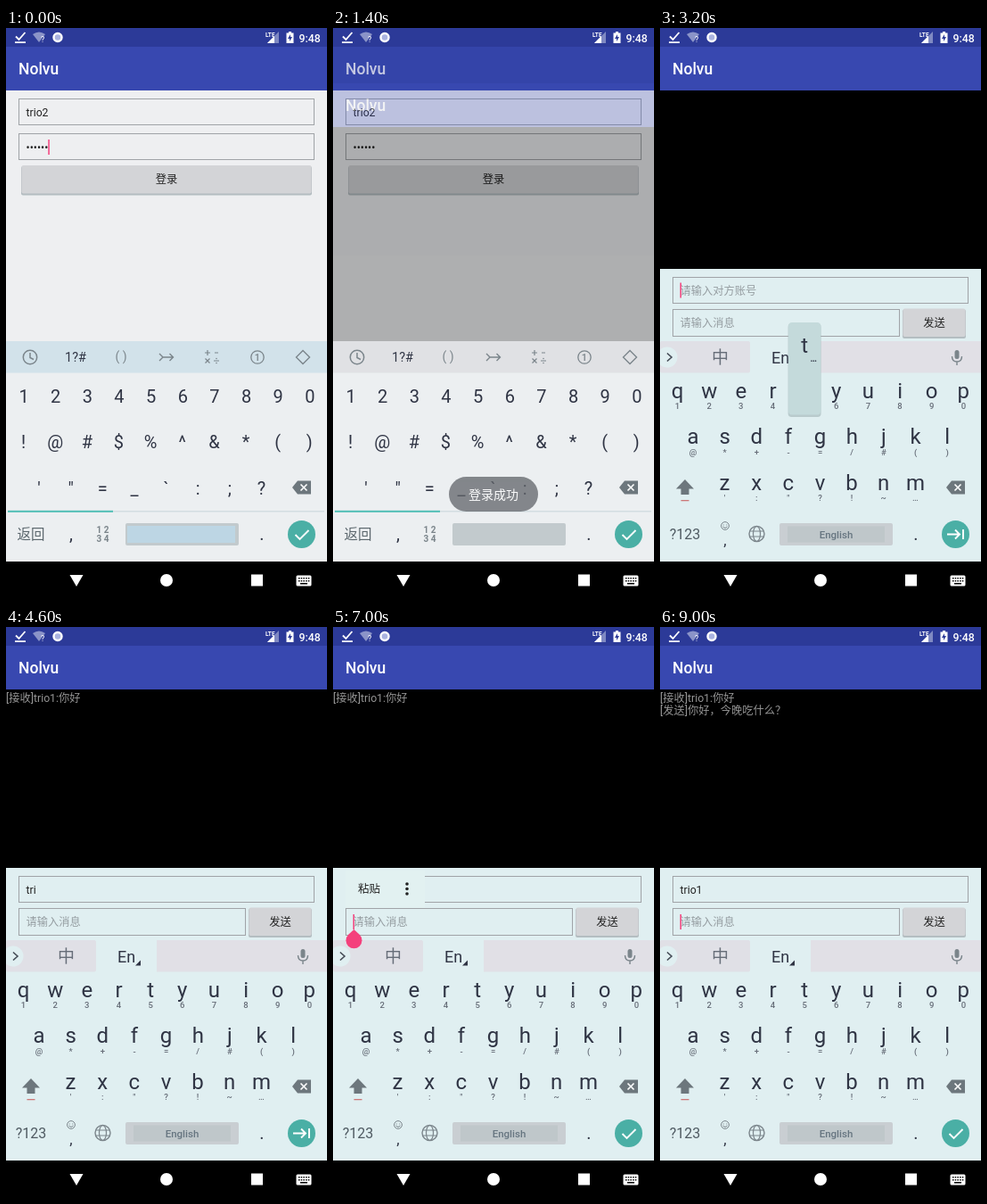
An HTML page that plays this animation: 360x640 px, repeating every 9200 ms.

```html
<!DOCTYPE html>
<html lang="zh">
<head>
<meta charset="utf-8">
<style>
  html, body { margin: 0; width: 100%; height: 100%; overflow: hidden; background: #000; }
  svg { display: block; width: 360px; height: 640px; }
  text { font-family: Roboto, "Noto Sans CJK SC", "Noto Sans CJK", sans-serif; white-space: pre; }
</style>
</head>
<body>
<svg id="stage" viewBox="0 0 360 640"></svg>
<script>
const LOOP = 9200, STEP = 200;
const APP = 'Nolvu', USER = 'trio2', PEER = 'trio1', MESSAGE = '你好，今晚吃什么？';
const INK = '#2f3444', GREY = '#7b858b', PINK = '#f4407c', TEAL = '#4aafa5', PALE = '#e0eff1';
const stage = document.getElementById('stage');
const pen = document.createElement('canvas').getContext('2d');
pen.font = '12.25px Roboto, "Noto Sans CJK SC", sans-serif';

const rect = (x, y, w, h, fill, extra = '') =>
  `<rect x="${x}" y="${y}" width="${w}" height="${h}" fill="${fill}" ${extra}/>`;
const disc = (x, y, r, fill, extra = '') => `<circle cx="${x}" cy="${y}" r="${r}" fill="${fill}" ${extra}/>`;
const line = (d, stroke, width = 1.5, fill = 'none') =>
  `<path d="${d}" stroke="${stroke}" stroke-width="${width}" fill="${fill}"/>`;
const shape = (d, fill) => `<path d="${d}" fill="${fill}"/>`;
const text = (s, x, y, size, fill, extra = '') =>
  `<text x="${x}" y="${y}" font-size="${size}" fill="${fill}" ${extra}>${s.replace(/&/g, '&amp;')}</text>`;
const mid = (s, x, y, size, fill, weight = 400) =>
  text(s, x, y, size, fill, `text-anchor="middle" font-weight="${weight}"`);
const row = (keys, x0, y, size, weight = 400, fill = INK) =>
  [...keys].map((k, i) => mid(k, x0 + 35.65 * i, y, size, fill, weight)).join('');

const field = (x, y, w, h) => rect(x + .5, y + .5, w - 1, h - 1, 'none', 'stroke="#a0a3a7"');
const button = (label, x, y, w, h) =>
  rect(x - .5, y + 1, w + 1, h + 1, '#b4bdc1', 'rx="2"') + rect(x, y, w, h, '#d3d4d7', 'rx="2"') +
  mid(label, x + w / 2, y + h / 2 + 4.5, 12.25, '#222', 500);
const caret = (s, y) => rect(22.5 + pen.measureText(s).width, y, 1.5, 17, PINK);
const blink = (t, start) => (t - start) % 1000 < 500;

const toolbar = () => rect(0, 21, 360, 49, '#3848b0') + text(APP, 14, 52, 17.5, '#fff', 'font-weight="500"');

function statusBar() {
  return rect(0, 0, 360, 21, '#2c3a98') +
    line('M11 9.5l3.5 3.5 7-8M10 16.2h12', '#fff', 1.8) +
    shape('M30 7q7-5 14 0l-7 9z', '#8b94c8') + text('?', 39, 16, 9, '#fff') +
    disc(58, 10.5, 4.5, '#aab3e0', 'stroke="#fff" stroke-width="2.4"') +
    text('LTE', 291, 9.5, 6.5, '#fff', 'font-weight="700"') +
    shape('M306 4v13h-13z', '#7f89c2') + shape('M301 9v8h-8z', '#fff') +
    shape('M317 4h3v1.5h2.5V17h-8V5.500h2.500z', '#fff') + shape('M319 7l-3 5h2v3l3-5h-2z', '#2c3a98') +
    text('9:48', 328.5, 15.5, 12.3, '#fff', 'font-weight="500"');
}

function navBar() {
  let dots = '';
  for (let i = 0; i < 10; i++) dots += rect(328 + (i % 5) * 2.7, 616 + (i / 5 | 0) * 3, 1.5, 1.5, '#000');
  return rect(0, 598, 360, 42, '#000') + shape('M71.500 613h15l-7.500 13z', '#fff') + disc(180, 619, 7, '#fff') +
    rect(275, 612.5, 13, 13, '#fff') + rect(325.500, 613.5, 17, 12, '#fff', 'rx="1.500"') + dots +
    rect(330, 622, 8, 1.5, '#000');
}

function login(t) {
  return rect(0, 70, 360, 281, '#eeeff1') +
    field(14, 79, 332, 30) + text(USER, 22.5, 98.5, 12.25, '#222') +
    field(14, 118, 332, 30) + text('••••••', 22.5, 137.5, 12.25, '#222') +
    (t < 1400 && blink(t, 0) ? caret('••••••', 125) : '') +
    button('登录', 17.5, 154, 325, 31.500);
}

function enterKey(checked) {
  return disc(331.5, 567.5, 15.5, TEAL) +
    line(checked ? 'M324.500 568l5 5 10-10' : 'M322 567.500h14M331 562.500l5 5-5 5M340 562v11', '#fff', 1.9);
}
const backspace = () => shape('M327 507.500h15v15h-15l-6-7.500z', '#6d777d') + line('M330.500 511.500l7 7m0-7l-7 7', '#fff', 1.6);

function symbolKeyboard(t) {
  const tinted = t < 1200;
  return rect(0, 351, 360, 247, '#eceff1') + rect(0, 351, 360, 35.5, tinted ? '#d2e2ea' : '#e0e1e4') +
    disc(27, 369, 7.7, 'none', `stroke="${GREY}" stroke-width="1.500"`) + line('M27 364v5.500l4 2', GREY) +
    mid('1?#', 78, 374, 14.5, INK) + mid('( )', 129, 373, 14, GREY) +
    line('M172 365l4 4-4 4M176 369h11M183.500 365l4 4-4 4', GREY, 1.4) +
    line('M223 364h6M226 361v6M234 364h4M223.500 370.500l5 5m0-5l-5 5M233 373h6', GREY, 1.2) +
    disc(236, 370.5, .8, GREY) + disc(236, 375.5, .8, GREY) +
    disc(282, 369, 7.2, 'none', `stroke="${GREY}" stroke-width="1.300"`) + mid('1', 282, 373, 11, GREY, 500) +
    line('M333 361.500l7.500 7.500-7.500 7.500-7.500-7.500z', GREY, 1.4) +
    row('1234567890', 20, 420, 20) + row('!@#$%^&*()', 19.5, 471, 20) + row('\'"=_`:;?', 37, 523, 20) + backspace() +
    rect(2, 541, 355, 1.5, '#d3dde1') + rect(2, 540.8, 118, 2, '#4fbfb5') +
    mid('返回', 28, 573, 15.5, '#5a666c') + mid(',', 73, 574, 20, INK) +
    mid('1 2', 108.5, 566, 10, GREY, 700) + mid('3 4', 108.5, 576, 10, GREY, 700) +
    rect(134, 555, 127, 25, '#c2cacd', 'rx="2"') + (tinted ? rect(136, 558, 121, 19, '#bdd6e4') : '') +
    mid('.', 287, 574, 20, INK) + enterKey(true);
}

function letterKeyboard(t) {
  const hints = (s, x, y) => row(s, x, y, 9.5, 500, '#666d78');
  return rect(0, 351, 360, 247, PALE) + rect(0, 351, 101, 35.5, '#e0e0e6', 'rx="2"') +
    rect(169, 351, 191, 35.5, '#e1e0e6') + disc(8, 369, 11.5, PALE) + line('M8 364.500l5 4.500-5 4.500', '#444b55', 1.6) +
    mid('中', 67.5, 376, 19, '#666d78') + mid('En', 135, 375.500, 18, INK) + shape('M151 373.500v6h-6z', INK) +
    rect(330.500, 361, 5, 10, GREY, 'rx="2.500"') + line('M327.500 368q0 6 5.500 6t5.500-6M333 374v4', GREY, 1.4) +
    row('qwertyuiop', 19.5, 415, 24) + hints('1234567890', 19.5, 427) +
    row('asdfghjkl', 37, 466, 24) + hints('@*+-=/#()', 37, 479) +
    row('zxcvbnm', 72.5, 518, 24) + hints('\':"?!~…', 72.5, 530) + backspace() +
    shape('M28 506l10 10.500h-5.500v6.500h-9v-6.500H18z', '#6d777d') + rect(23.5, 529, 9, 1.3, '#c77') +
    mid('?123', 28, 573, 16, '#4f5a62') + mid(',', 73, 580, 17, INK) +
    disc(73, 558, 4.4, 'none', `stroke="${GREY}"`) + line('M70.500 559q2.500 3 5 0M71.300 556.500v1M74.700 556.500v1', GREY, 1) +
    disc(108.5, 567, 8.5, 'none', `stroke="${GREY}" stroke-width="1.400"`) +
    `<ellipse cx="108.5" cy="567" rx="4" ry="8.5" fill="none" stroke="${GREY}" stroke-width="1.2"/>` +
    line('M101 564h15M101 570h15', GREY, 1.2) +
    rect(134, 555, 127, 25, '#c9ced2', 'rx="2"') + rect(143, 558.5, 109, 18, '#bfc7ca') +
    mid('English', 197.5, 571.5, 11.5, '#667580', 500) + mid('.', 287, 574, 20, INK) + enterKey(t >= 6000);
}

// Each key: press time, release time, column in the top row, label.
const PRESSES = [[3200, 3400, 4, 't'], [3400, 3600, 3, 'r'], [3800, 4000, 7, 'i'], [4800, 5000, 8, 'o'], [5200, 5600, 0, '1']];

function keyPopup(t) {
  return PRESSES.filter(([from, to]) => t >= from && t < to).map(([, , col, label]) => {
    const x = 19.5 + 35.65 * col;
    return rect(x - 18.5, 331, 37, 105, '#a9bcbe', 'rx="4" opacity=".7"') +
      rect(x - 18, 330, 36, 103.5, '#c4dadb', 'rx="4"') + mid(label, x, 363.5, 24, INK) + mid('…', x + 10, 374, 10, INK, 700);
  }).join('');
}

function chat(t) {
  const typed = PRESSES.filter(p => t >= p[1]);
  const account = PEER.slice(0, typed.length);
  const message = t >= 7600 && t < 8600 ? MESSAGE : '';
  const onMessage = t >= 6000, menu = t >= 6600 && t < 7400;
  const focusTime = t >= 8600 ? 8600 : t >= 7600 ? 7600 : onMessage ? 6000 : typed.length ? typed.at(-1)[1] : 1800;
  const entry = (s, hint, y) => text(s || hint, 22.5, y, 12.25, s ? '#222' : '#959da1');
  let out = rect(0, 70, 360, 200, '#000') + rect(0, 270, 360, 81, PALE);
  if (t >= 3800) out += text(`[接收]${PEER}:你好`, 0, 83.5, 12.25, '#969696');
  if (t >= 8600) out += text(`[发送]${MESSAGE}`, 0, 97.5, 12.25, '#969696');
  out += field(14, 279, 332, 30) + entry(account, '请输入对方账号', 298.5) +
    field(14, 315, 255, 31) + entry(message, '请输入消息', 334.5) + button('发送', 272.500, 314.500, 70, 31.500);
  if (menu) {
    out += rect(14, 273, 89, 42, '#e2f1f1') + mid('粘贴', 40.5, 298, 12.5, '#222', 500) +
      [288, 293.5, 299].map(y => disc(83, y, 1.8, '#222')).join('');
  }
  if (blink(t, focusTime)) out += onMessage ? caret(message, 322) : caret(account, 285.5);
  return out;
}

const pasteHandle = t => t >= 6600 && t < 7400 ? shape('M23.500 339l6.500 6a9 9 0 1 1-13 0z', PINK) : '';

function toast(t) {
  if (t < 1400 || t >= 3000) return '';
  return `<g opacity="${t < 1600 ? .8 : 1}">` + rect(130, 503, 100, 39, '#62666b', 'rx="19.500" fill-opacity=".95"') +
    mid('登录成功', 180, 528, 14, '#fff') + '</g>';
}

function scene(t) {
  let out = toolbar();
  if (t < 1600) {
    out += login(t);
    if (t >= 1400) out += `<g opacity=".27" transform="translate(0 41)">${rect(0, -41, 360, 62, '#2c3a98')}${toolbar()}${rect(0, 70, 360, 250, '#000')}</g>`;
    out += symbolKeyboard(t);
  } else {
    out += chat(t) + letterKeyboard(t) + pasteHandle(t) + keyPopup(t);
  }
  return out + statusBar() + navBar() + toast(t);
}

let shown = -1;
function tick() {
  const t = Math.floor(performance.now() % LOOP / STEP) * STEP;
  if (t !== shown) stage.innerHTML = scene(shown = t);
  requestAnimationFrame(tick);
}
tick();
</script>
</body>
</html>
```
